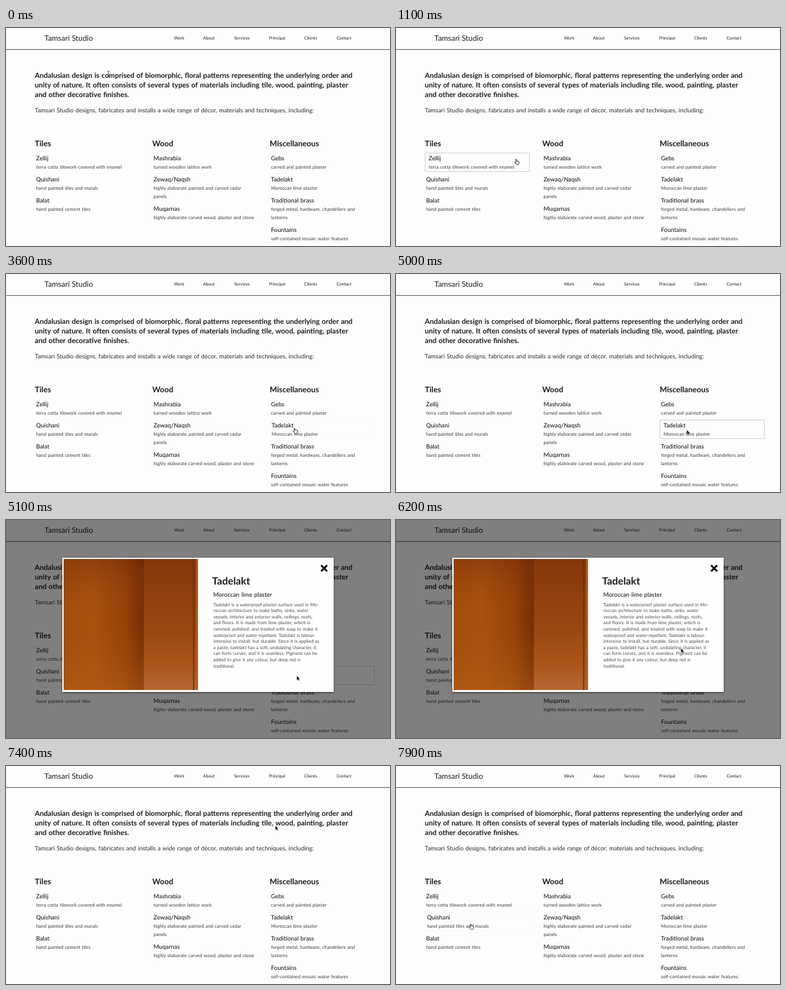
Animation, 600 px wide and 341 px high, one loop 8 s. Source, as an HTML page:

```html
<!DOCTYPE html>
<html lang="en">
<head>
<meta charset="utf-8">
<title>Andalusian design</title>
<style>
  html, body { margin: 0; width: 100%; height: 100%; overflow: hidden; background: #fdfdfd; }
  svg { display: block; width: 100vw; height: 100vh; }
  text { font-family: Lato, "Open Sans", sans-serif; fill: #1c1c1c; text-rendering: geometricPrecision; }
  .logo { font-size: 11.9px; }
  .nav { font-size: 6.7px; }
  .lead { font-size: 11.1px; font-weight: 700; word-spacing: .65px; }
  .intro { font-size: 9.4px; word-spacing: .65px; fill: #2a2a2a; }
  .head { font-size: 12.2px; font-weight: 700; }
  .name { font-size: 9.3px; font-weight: 500; word-spacing: .6px; }
  .desc { font-size: 7.3px; font-weight: 500; word-spacing: .5px; letter-spacing: .03px; fill: #484848; }
  .title { font-size: 15.8px; font-weight: 700; }
  .body { font-size: 7.1px; word-spacing: .5px; fill: #484848; }
</style>
</head>
<body>
<svg id="stage" viewBox="0 0 600 341" preserveAspectRatio="none">
  <defs>
    <linearGradient id="wall">
      <stop offset="0" stop-color="#a34c0d"/>
      <stop offset=".35" stop-color="#a9520f"/>
      <stop offset=".75" stop-color="#964309"/>
      <stop offset=".92" stop-color="#7c3206"/>
      <stop offset="1" stop-color="#742e06"/>
    </linearGradient>
    <linearGradient id="panel" x2="0" y2="1">
      <stop offset="0" stop-color="#84370a"/>
      <stop offset=".5" stop-color="#97470f"/>
      <stop offset=".8" stop-color="#a85519"/>
      <stop offset="1" stop-color="#b86a36"/>
    </linearGradient>
    <linearGradient id="light" x2="0" y2="1">
      <stop offset="0" stop-color="#6a2604" stop-opacity=".4"/>
      <stop offset=".45" stop-color="#a04a0c" stop-opacity="0"/>
      <stop offset="1" stop-color="#bb6620" stop-opacity=".45"/>
    </linearGradient>
    <filter id="shadow" x="-5%" y="-5%" width="110%" height="112%">
      <feDropShadow dx="0" dy="1" stdDeviation="1.6" flood-opacity=".65"/>
    </filter>
  </defs>
  <rect width="600" height="341" fill="#fdfdfd"/>
  <g id="page">
    <rect y="33" width="600" height="1" fill="#666"/>
    <rect y="34" width="600" height="1" fill="#e4e4e4"/>
  </g>
  <g id="popup">
    <rect width="600" height="341" fill="#050200" opacity=".5"/>
    <rect x="88" y="59" width="424" height="210" fill="#fefefe" filter="url(#shadow)"/>
    <rect x="90" y="61" width="126" height="205" fill="url(#wall)"/>
    <rect x="90" y="61" width="126" height="205" fill="url(#light)"/>
    <rect x="215.5" y="61" width="84.5" height="205" fill="url(#panel)"/>
    <rect x="292" y="61" width="2.5" height="205" fill="#6f2d08" opacity=".75"/>
    <rect x="297" y="61" width="3" height="205" fill="#b9590f"/>
    <path d="M492.4 70.8l9.4 9.4m0-9.4l-9.4 9.4" stroke="#0c0c0c" stroke-width="2.9"/>
  </g>
  <g id="cursor">
    <path id="arrow" d="M0 0V6.4l1.5-1.3 1 2.3 1.1-.5-1-2.2h2z" fill="#0a0a0a" stroke="#fff" stroke-width=".5" paint-order="stroke"/>
    <path id="hand" transform="translate(-2 -.5)" d="M2 1q.8-.8 1.3.2l.6 2.3 2.6.5q1 .3.9 1.4l-.4 2.2-.8 1.6H3.3L.6 6q-.4-1 .7-.9l1.2.7z" fill="#fff" stroke="#222" stroke-width=".9"/>
    <path id="beam" d="M-1.8-4.5Q0-4.5 0-3.5V3.5Q0 4.5-1.8 4.5M1.8-4.5Q0-4.5 0-3.5M0 3.5Q0 4.5 1.8 4.5" fill="none" stroke="#333" stroke-width=".9"/>
  </g>
</svg>
<script>
const LOOP = 8000, STEP = 100, FADE = 300;
const $ = id => document.getElementById(id);

function add(parent, tag, attrs, content = '') {
  const el = document.createElementNS('http://www.w3.org/2000/svg', tag);
  for (const key in attrs) el.setAttribute(key, attrs[key]);
  el.textContent = content;
  return parent.appendChild(el);
}
const write = (parent, style, x, y, content) => add(parent, 'text', { class: style, x, y }, content);
const writeLines = (parent, style, x, y, gap, lines) =>
  lines.forEach((line, i) => write(parent, style, x, y + i * gap, line));

const page = $('page'), popup = $('popup');

write(page, 'logo', 60, 20.2, 'Tamsari Studio');
[[262.5, 'Work'], [308, 'About'], [356.5, 'Services'], [411, 'Principal'], [466, 'Clients'], [516.5, 'Contact']]
  .forEach(([x, label]) => write(page, 'nav', x, 18.4, label));
writeLines(page, 'lead', 45, 78.4, 14.7, [
  'Andalusian design is comprised of biomorphic, floral patterns representing the underlying order and',
  'unity of nature. It often consists of several types of materials including tile, wood, painting, plaster',
  'and other decorative finishes.'
]);
write(page, 'intro', 45, 131.6,
  'Tamsari Studio designs, fabricates and installs a wide range of décor, materials and techniques, including:');

const columns = [
  [45, 'Tiles', [
    ['Zellij', 'terra cotta tilework covered with enamel'],
    ['Quishani', 'hand painted tiles and murals'],
    ['Balat', 'hand painted cement tiles']]],
  [228.5, 'Wood', [
    ['Mashrabia', 'turned wooden lattice work'],
    ['Zewaq/Naqsh', 'highly elaborate painted and carved cedar', 'panels'],
    ['Muqarnas', 'highly elaborate carved wood, plaster and stone']]],
  [412, 'Miscellaneous', [
    ['Gebs', 'carved and painted plaster'],
    ['Tadelakt', 'Moroccan lime plaster'],
    ['Traditional brass', 'forged metal, hardware, chandeliers and', 'lanterns'],
    ['Fountains', 'self-contained mosaic water features']]]
];

// Pointer enters and leaves, in ms
const hovers = {
  Zellij: [800, 2150],
  Mashrabia: [2300, 2950],
  Tadelakt: [3500, 5050],
  Quishani: [7780, LOOP * 2]
};

const items = [];
for (const [x, heading, list] of columns) {
  write(page, 'head', x, 185, heading);
  let y = 206.6;
  for (const [name, ...lines] of list) {
    const box = add(page, 'rect', {
      x: Math.floor(x) + .5, y: y - 11.1, width: 163, height: 29,
      fill: 'none', stroke: '#cfcfcf', opacity: 0
    });
    const label = add(page, 'g', {});
    write(label, 'name', x + 2, y, name);
    writeLines(label, 'desc', x + 2, y + 13, 13, lines);
    if (hovers[name]) items.push({ box, label, span: hovers[name] });
    y += 20 + 13 * lines.length;
  }
}

write(popup, 'title', 322, 101.2, 'Tadelakt');
write(popup, 'name', 323.8, 120, 'Moroccan lime plaster');
writeLines(popup, 'body', 324, 134.5, 9.6, [
  'Tadelakt is a waterproof plaster surface used in Mo-',
  'roccan architecture to make baths, sinks, water',
  'vessels, interior and exterior walls, ceilings, roofs,',
  'and floors. It is made from lime plaster, which is',
  'rammed, polished, and treated with soap to make it',
  'waterproof and water-repellant. Tadelakt is labour-',
  'intensive to install, but durable. Since it is applied as',
  'a paste, tadelakt has a soft, undulating character, it',
  'can form curves, and it is seamless. Pigment can be',
  'added to give it any colour, but deep red is',
  'traditional.'
]);

// time, x, y, pointer shape from then on
const path = [
  [0, 160, 72, 'beam'], [100, 157, 70.5, 'beam'], [500, 157, 70.5, 'beam'],
  [700, 163, 95, 'beam'], [800, 172, 140, 'arrow'], [1000, 186, 203, 'hand'],
  [1100, 187, 205, 'hand'], [2100, 187, 205, 'hand'], [2200, 205, 206, 'hand'],
  [2400, 335, 207, 'hand'], [2600, 390, 205, 'hand'], [2800, 390, 205, 'hand'],
  [2900, 391, 205, 'hand'], [3100, 400, 210, 'arrow'], [3500, 446, 238, 'hand'],
  [3700, 454.5, 244, 'hand'], [5000, 454.5, 244, 'arrow'], [5700, 454.5, 244, 'arrow'],
  [6500, 440, 175, 'arrow'], [7300, 421, 93.5, 'arrow'], [7600, 421, 93.5, 'arrow'],
  [7700, 360, 125, 'beam'], [7800, 200, 215, 'arrow'], [7900, 116, 247, 'hand'],
  [LOOP, 116, 247, 'hand']
];

const smooth = u => {
  u = Math.min(1, Math.max(0, u));
  return u * u * (3 - 2 * u);
};

function draw(t) {
  for (const { box, label, span: [enter, leave] } of items) {
    const p = smooth((t - enter) / FADE) - smooth((t - leave) / FADE);
    box.setAttribute('opacity', p * p);
    label.setAttribute('transform', `translate(${4 * p} 0)`);
  }
  popup.style.display = t >= 5100 && t < 7400 ? '' : 'none';

  const next = path.findIndex(key => key[0] > t);
  const [t0, x0, y0, shape] = path[next - 1];
  const [t1, x1, y1] = path[next];
  const u = (t - t0) / (t1 - t0);
  $('cursor').setAttribute('transform', `translate(${x0 + (x1 - x0) * u} ${y0 + (y1 - y0) * u})`);
  for (const id of ['arrow', 'hand', 'beam']) $(id).style.display = id === shape ? '' : 'none';
}

const start = performance.now();
function tick() {
  const t = (performance.now() - start) % LOOP;
  draw(Math.floor(t / STEP) * STEP);
  requestAnimationFrame(tick);
}
tick();
</script>
</body>
</html>
```
